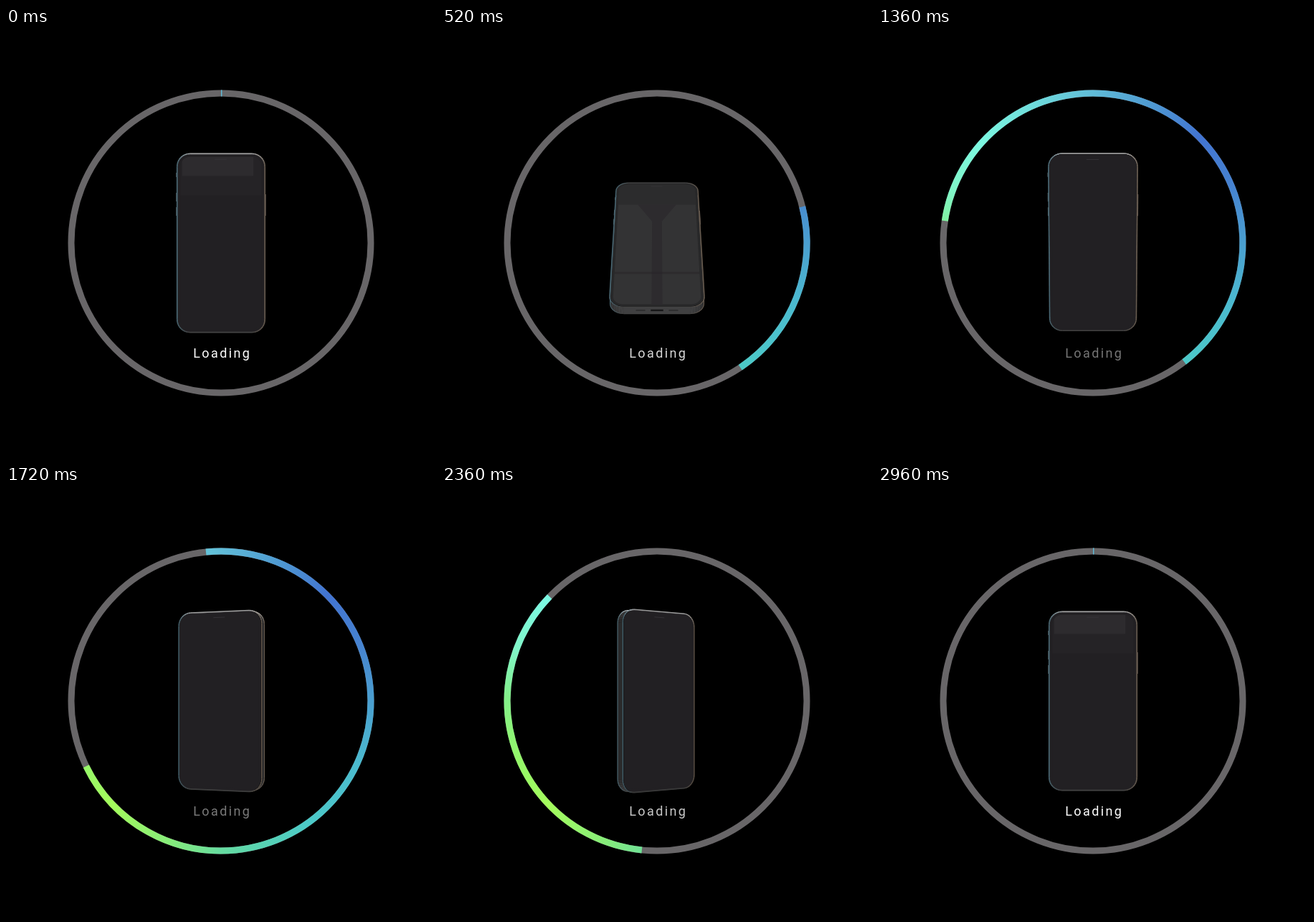
Recreate the animation shown at these times as an HTML page with a canvas. Size 600 by 600 pixels, loop 3000 ms.

```html
<!DOCTYPE html>
<html lang="en">
<head>
<meta charset="utf-8">
<title>Loading</title>
<style>
  html, body { margin: 0; width: 100%; height: 100%; overflow: hidden; background: #000; }
  canvas { display: block; }
</style>
</head>
<body>
<canvas id="stage" width="600" height="600"></canvas>
<script>
const ctx = document.getElementById('stage').getContext('2d');
const LOOP = 3000, STEP = 40, MID = 300;
const RAD = Math.PI / 180;
const W = 61, H = 124, DEPTH = 6.5, CORNER = 18, CAMERA = 1050;

// [time, degrees clockwise from the top]
const TAIL = [[0, 0], [520, 76], [960, 170.4], [1360, 278.5], [2040, 427.1],
  [2240, 499], [2360, 545.8], [2800, 685], [2960, 720]];
const HEAD = [[0, 0], [520, 146.2], [560, 155], [960, 296.3], [1360, 502.5],
  [2040, 657.3], [2360, 674.2], [2800, 700], [2960, 720]];
const PITCH = [[0, 0], [500, 46.5], [1000, -44.5], [1500, 0]];
const YAW = [[1500, 0], [2000, 48], [2480, -50], [2960, 0]];

const clamp = v => Math.max(0, Math.min(1, v));
const rgb = c => `rgb(${c.map(v => Math.round(v)).join(',')})`;
const mix = (a, b, u) => a.map((v, i) => v + (b[i] - v) * u);

// Monotone cubic curve through the keys
function curve(keys, t) {
  const last = keys.length - 1;
  const slope = i => (keys[i + 1][1] - keys[i][1]) / (keys[i + 1][0] - keys[i][0]);
  const tangent = i => {
    if (i === 0) return slope(0) / 2;
    if (i === last) return slope(last - 1) / 2;
    const a = slope(i - 1), b = slope(i);
    return 2 * a * b / (a + b);
  };
  if (t >= keys[last][0]) return keys[last][1];
  let i = 0;
  while (t >= keys[i + 1][0]) i++;
  const [t0, a] = keys[i], [t1, b] = keys[i + 1];
  const h = t1 - t0, u = (t - t0) / h, v = 1 - u;
  return a * (1 + 2 * u) * v * v + tangent(i) * h * u * v * v
    + b * u * u * (3 - 2 * u) - tangent(i + 1) * h * u * u * v;
}

function swing(keys, t) {
  for (let i = 1; i < keys.length; i++) {
    const [t0, a] = keys[i - 1], [t1, b] = keys[i];
    if (t >= t0 && t < t1) return a + (b - a) * (0.5 - 0.5 * Math.cos(Math.PI * (t - t0) / (t1 - t0)));
  }
  return 0;
}

// Rounded rectangle as points with outward normals
function outline(inset) {
  const r = CORNER - inset, list = [];
  for (let c = 0; c < 4; c++) {
    const sx = c === 0 || c === 3 ? 1 : -1, sy = c < 2 ? 1 : -1;
    for (let k = 0; k <= 8; k++) {
      const a = (c + k / 8) * Math.PI / 2, nx = Math.cos(a), ny = Math.sin(a);
      list.push({ x: sx * (W - CORNER) + r * nx, y: sy * (H - CORNER) + r * ny, nx, ny });
    }
  }
  return list;
}
const BODY = outline(0), BEZEL = outline(1), GLASS = outline(4.5);

function camera(pitch, yaw) {
  const cp = Math.cos(pitch), sp = Math.sin(pitch), cy = Math.cos(yaw), sy = Math.sin(yaw);
  return (x, y, z) => {
    const x1 = x * cy + z * sy, z1 = z * cy - x * sy;
    const y2 = y * cp + z1 * sp, z2 = z1 * cp - y * sp;
    const k = CAMERA / (CAMERA + z2);
    return [MID + x1 * k, MID + y2 * k];
  };
}

function trace(points) {
  ctx.beginPath();
  points.forEach(p => ctx.lineTo(p[0], p[1]));
}
function fill(points, color) {
  trace(points);
  ctx.closePath();
  ctx.fillStyle = color;
  ctx.fill();
}
function line(points, color, width) {
  trace(points);
  ctx.strokeStyle = color;
  ctx.lineWidth = width;
  ctx.stroke();
}

// Metal tint: bright on top, cool on the left, warm on the right
function metal(n, base, top) {
  const up = Math.max(0, -n.ny) ** 2, l = Math.max(0, -n.nx), r = Math.max(0, n.nx);
  return rgb([base + top * up + 8 * l + 38 * r,
    base + top * up + 38 * l + 26 * r,
    base + top * up + 50 * l + 14 * r]);
}

function drawPhone(pitch, yaw) {
  const view = camera(pitch * RAD, yaw * RAD);
  const face = (list, z = -DEPTH) => list.map(p => view(p.x, p.y, z));
  const flat = list => list.map(([x, y]) => view(x, y, -DEPTH));
  const front = face(BODY), back = face(BODY, DEPTH), n = BODY.length;
  const turn = Math.abs(Math.sin(yaw * RAD)), tilt = Math.sin(pitch * RAD);

  // Side keys
  [[-1, -98, -92], [-1, -70, -58], [-1, -50, -38], [1, -68, -38]].forEach(([s, a, b]) =>
    line([view(s * 62, a, 0), view(s * 62, b, 0)], s < 0 ? '#566a72' : '#6c6058', 1.4));

  // Side walls
  for (let i = 0; i < n; i++) {
    const j = (i + 1) % n, p = BODY[i];
    const wall = 42 + 26 * Math.max(0, -p.ny) + 22 * Math.max(0, p.ny);
    const color = rgb([wall, wall, wall + 1]);
    const quad = [front[i], front[j], back[j], back[i]];
    fill(quad, color);
    line(quad, color, 0.6);
  }
  for (let i = 0; i < n; i++) {
    line([back[i], back[(i + 1) % n]], metal(BODY[i], 68, 140), 1.1);
  }
  if (tilt > 0.1) {
    line([view(-8, H, 0), view(8, H, 0)], '#161617', 2.4);
    [-1, 1].forEach(s => line([view(s * 15, H, 0), view(s * 27, H, 0)], '#252526', 1.2));
  }

  // Front
  const lit = clamp(tilt / 0.72);
  const base = [34, 32, 35];
  for (let i = 0; i < n; i++) {
    line([front[i], front[(i + 1) % n]],
      metal(BODY[i], 66 - 16 * turn, 95 * clamp(1 - 1.3 * Math.abs(tilt))), 1.4);
  }
  fill(face(BEZEL), rgb(mix(base, [40, 40, 41], lit)));
  fill(face(GLASS), rgb(mix(base, [51, 51, 52], lit)));

  ctx.save();
  trace(face(GLASS));
  ctx.clip();
  if (lit > 0) {
    ctx.globalAlpha = lit;
    fill(flat([[-W, -H], [W, -H], [W, -74], [-W, -74]]), '#2c2c2d');
    fill(flat([[-28, -74], [28, -74], [7, -38], [7, H], [-7, H], [-7, -38]]), '#2d2b2e');
    fill(flat([[-W, 62], [W, 62], [W, 66], [-W, 66]]), 'rgba(40,38,41,.55)');
  }
  const glare = clamp(1 - (Math.abs(pitch) + Math.abs(yaw)) / 8);
  if (glare > 0) {
    ctx.globalAlpha = glare;
    fill(flat([[-W, -H], [W, -H], [W, -66], [-W, -66]]), 'rgba(255,255,255,.012)');
    fill(flat([[-54, -H], [45, -H], [45, -93], [-54, -93]]), 'rgba(255,255,255,.035)');
  }
  ctx.restore();
  line(flat([[-9, -116], [8, -116]]), '#343236', 1);
}

function ringPaint() {
  const g = ctx.createConicGradient(-Math.PI / 2, MID, MID);
  [[0, '#60bcd8'], [22, '#4f9bd2'], [45, '#4274d2'], [67, '#4682d0'], [90, '#4a9fd0'],
    [115, '#4bbbcf'], [145, '#4ccac8'], [165, '#58d3b2'], [180, '#66dca0'],
    [200, '#86ec7a'], [226, '#a4fc5c'], [250, '#92f66c'], [272, '#83f08c'],
    [290, '#80f6c8'], [312, '#7cf9e2'], [335, '#70dedc'], [360, '#60bcd8']]
    .forEach(([deg, color]) => g.addColorStop(deg / 360, color));
  return g;
}
const PAINT = ringPaint();

function arc(from, to, style) {
  ctx.beginPath();
  ctx.arc(MID, MID, 209, (from - 90) * RAD, (to - 90) * RAD);
  ctx.strokeStyle = style;
  ctx.lineWidth = 9;
  ctx.stroke();
}

function drawText(t) {
  const alpha = 0.725 + 0.275 * Math.cos(2 * Math.PI * t / LOOP);
  ctx.font = '18px Roboto, sans-serif';
  ctx.letterSpacing = '2.4px';
  ctx.textAlign = 'left';
  ctx.textBaseline = 'alphabetic';
  ctx.fillStyle = `rgba(255,255,255,${alpha})`;
  ctx.fillText('Loading', 261.2, 460);
}

function draw(t) {
  ctx.fillStyle = '#000';
  ctx.fillRect(0, 0, 600, 600);
  arc(0, 360, '#686668');
  const tail = curve(TAIL, t), head = Math.max(curve(HEAD, t), tail + 0.4);
  arc(tail, head, PAINT);
  drawPhone(swing(PITCH, t), swing(YAW, t));
  drawText(t);
}

ctx.lineJoin = 'round';
ctx.lineCap = 'butt';
function tick() {
  draw(Math.floor(performance.now() % LOOP / STEP) * STEP);
  requestAnimationFrame(tick);
}
tick();
</script>
</body>
</html>
```
